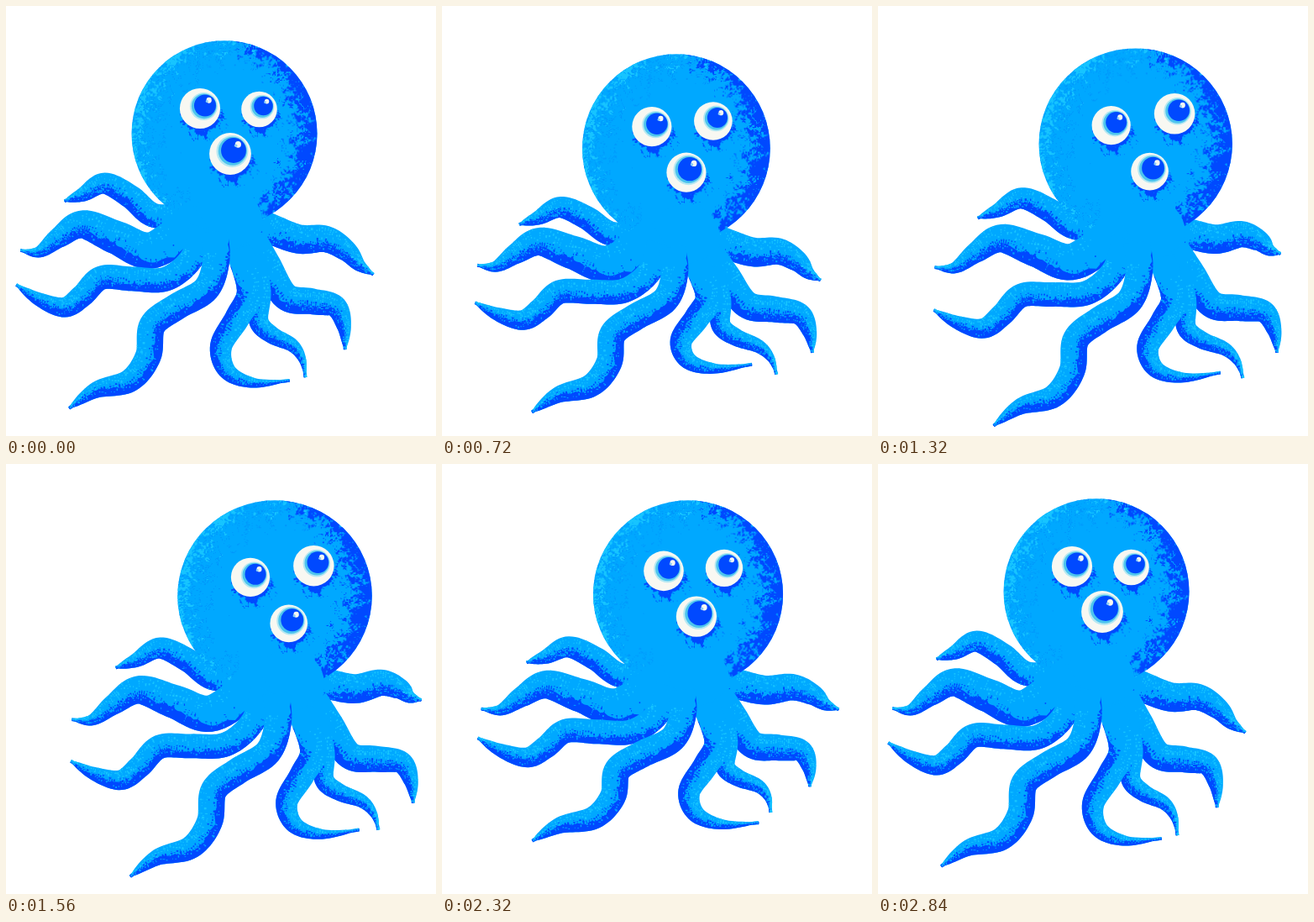
An HTML page with a canvas for the animation above (2880 ms loop, 512x512 px).

```html
<!DOCTYPE html>
<html lang="en">
<head>
<meta charset="utf-8">
<title>Octopus</title>
<style>
  html, body { margin: 0; width: 100%; height: 100%; overflow: hidden; background: #fff; }
  canvas { display: block; width: 512px; height: 512px; }
</style>
</head>
<body>
<canvas id="stage" width="512" height="512"></canvas>
<script>
const ctx = document.getElementById('stage').getContext('2d');
const BASE = '#00a8ff', DARK = '#0049ff', LIGHT = '#16c4ff', WHITE = '#f8f8f2';
const LOOP = 2880, CYCLE = 2840, STEP = 40;

// Where the head's centre is at a few times; the rest of the body follows it.
const HEAD_PATH = [
  { t: 0, x: 260, y: 152 }, { t: 400, x: 271, y: 163 }, { t: 1080, x: 291, y: 171 },
  { t: 1560, x: 320, y: 157 }, { t: 2000, x: 319, y: 156 }, { t: 2320, x: 293, y: 155 }
];

// Smooth closed curve through the keys.
function along(path, t, axis) {
  const n = path.length;
  const key = i => path[(i + n) % n];
  const span = i => (key(i + 1).t - key(i).t + CYCLE) % CYCLE;
  const rise = i => (key(i + 1)[axis] - key(i)[axis]) / span(i);
  const slope = i => (span(i) * rise(i - 1) + span(i - 1) * rise(i)) / (span(i - 1) + span(i));
  let i = n - 1;
  while (path[i].t > t) i--;
  const h = span(i), u = (t - path[i].t) / h, v = 1 - u;
  return v * v * (1 + 2 * u) * key(i)[axis] + u * u * (3 - 2 * u) * key(i + 1)[axis] +
    h * u * v * (v * slope(i) - u * slope(i + 1));
}

function seeded(seed) {
  return () => {
    seed = (seed + 0x6d2b79f5) | 0;
    let r = Math.imul(seed ^ (seed >>> 15), 1 | seed);
    r = (r + Math.imul(r ^ (r >>> 7), 61 | r)) ^ r;
    return ((r ^ (r >>> 14)) >>> 0) / 4294967296;
  };
}

function hash(x, y) {
  let h = Math.imul(x, 374761393) + Math.imul(y, 668265263);
  h = Math.imul(h ^ (h >>> 13), 1274126177);
  return ((h ^ (h >>> 16)) >>> 0) / 4294967296;
}

function valueNoise(x, y) {
  const i = Math.floor(x), j = Math.floor(y);
  const ease = f => f * f * (3 - 2 * f);
  const mix = (a, b, f) => a + (b - a) * f;
  const u = ease(x - i), v = ease(y - j);
  return mix(mix(hash(i, j), hash(i + 1, j), u),
             mix(hash(i, j + 1), hash(i + 1, j + 1), u), v);
}

const grain = (x, y) =>
  0.5 * valueNoise(x / 5, y / 5) + 0.5 * valueNoise(x / 1.6 + 50, y / 1.6) - 0.5;

// Square texture; shade(x, y, px, py) gets coordinates from -1 to 1.
function texture(size, shade) {
  const tile = document.createElement('canvas');
  tile.width = tile.height = size;
  const c = tile.getContext('2d');
  for (let py = 0; py < size; py++) {
    for (let px = 0; px < size; px++) {
      const color = shade(2 * px / size - 1, 2 * py / size - 1, px, py);
      if (color) {
        c.fillStyle = color;
        c.fillRect(px, py, 1, 1);
      }
    }
  }
  return tile;
}

const headSkin = texture(228, (x, y, px, py) => {
  const n = grain(px, py), m = grain(px + 300, py + 90);
  const rim = Math.hypot(x + 0.2, y) - 0.25 * Math.max(0, 0.45 - x) + n * 0.62;
  if (rim > 1.04) return DARK;
  if (rim > 0.99) return '#007cff';
  const glow = Math.hypot(x - 0.2, y - 0.1) + m * 0.85;
  if (glow > 1.22) return LIGHT;
  if (glow < 1.1 && glow > 1.05) return '#0096fb';
});

const SHADOW = 1.6;
const eyeShadow = texture(78, (x, y, px, py) => {
  const r = Math.hypot(x, y) * SHADOW;
  const score = grain(px + 700, py) + 0.42 * (y + 0.2 * x) * SHADOW / r - 0.7 * (r - 1) - 0.2;
  return score > 0.06 ? DARK : score > 0 ? '#0078ff' : null;
});

// Place and radius relative to the head, how far each leans with the swing, and the pupil.
const EYES = [
  { at: [-29, -26, 23.6], lean: [0, -4, 0.5], pupil: [6, -3.5, 0.54] },
  { at: [44, -32.5, 22.8], lean: [-2.5, 3.5, -1.5], pupil: [5, -4, 0.53] },
  { at: [12, 28.5, 23.6], lean: [-5, -4.5, 1.3], pupil: [4, -4, 0.6] }
];

// An arm at rest, measured from the hub, root to tip. `side` is the shaded side,
// `taper` the power of the thinning; `swing` is the tip's cosine and sine sway.
function arm({ side, width, taper, swing, joints }, index) {
  const rnd = seeded(17 + 31 * index);
  const bell = () => rnd() + rnd() + rnd() - 1.5;
  const size = () => 0.8 + 2.4 * rnd() * rnd();
  const dabs = (count, across) => Array.from({ length: count }, () => {
    const s = rnd();
    return { s, v: across(s), w: size(), h: size() };
  });
  const points = [];
  for (let i = 0; i < joints.length; i += 2) points.push([joints[i], joints[i + 1]]);
  const n = points.length * 32;
  return {
    side, width, taper, swing, points,
    rough: Array.from({ length: 128 }, () => 0.28 * (rnd() - 0.5)),
    layers: [
      [DARK, dabs(n * 1.6, s => shadeEdge(s) + 0.4 * bell())],
      [BASE, dabs(n * 0.4, s => shadeEdge(s) + 0.2 + 0.25 * bell())],
      [LIGHT, dabs(n, () => -0.55 + 0.5 * bell())]
    ]
  };
}

// Inner border of the shaded band, 1 being the outer edge.
function shadeEdge(s) {
  return 0.36 + 0.9 * Math.max(0, 0.25 - s) / 0.25 - 1.2 * Math.max(0, s - 0.7);
}

const behind = [
  { side: -1, width: 29, taper: 4, swing: [6, 2.6, -3.4, 2],
    joints: [-41, -11, -87, -7, -118, -28, -150, -42, -177, -29, -200, -21] },
  { side: 1, width: 36, taper: 3, swing: [9, -3.5, 20, 13],
    joints: [20, -6, 51, 4, 82, 12, 113, 9, 136, 19, 150, 32, 165, 39] }
].map(arm);

const front = [
  { side: 1, width: 33, taper: 4, swing: [-4.8, 6.3, 4.1, 6.7],
    joints: [30, 18, 48, 46, 71, 81, 103, 86, 132, 91, 143, 113, 145, 138] },
  { side: 1, width: 25, taper: 2.5, swing: [-8, 7.6, 5, 4.4],
    joints: [32, 36, 41, 76, 40, 108, 57, 123, 83, 134, 96, 149, 101, 168] },
  { side: 1, width: 32, taper: 2.5, swing: [-4.8, 0.5, 8.9, -7.4],
    joints: [13, 28, 28, 74, 14, 103, -5, 134, 4, 161, 36, 172, 79, 168] },
  { side: -1, width: 45, taper: 2, swing: [5.6, 4.6, -4.3, -1.5],
    joints: [-32, -8, -89, 31, -134, 18, -175, 4, -204, 19, -229, 36, -252, 35] },
  { side: -1, width: 29, taper: 6, swing: [3.7, 5, -9.3, 2.6],
    joints: [-31, 5, -43, 41, -74, 65, -115, 66, -152, 66, -175, 87, -197, 101, -228, 93, -255, 78] },
  { side: -1, width: 32, taper: 7, swing: [-0.4, 5.5, -5, 8],
    joints: [-16, 10, -13, 41, -25, 75, -61, 96, -89, 117, -94, 152, -116, 180, -156, 191, -188, 212] }
].map((spec, i) => arm(spec, i + behind.length));

// Everything that depends on time, for one moment of the cycle.
function poseAt(t) {
  const a = 2 * Math.PI * t / CYCLE, cos = Math.cos(a), sin = Math.sin(a);
  const x = along(HEAD_PATH, t, 'x'), y = along(HEAD_PATH, t, 'y');
  return {
    cos, sin, x, y,
    rx: 113 - 2.5 * cos - 1.2 * sin,
    ry: 112.3 - 1.5 * cos,
    hubX: x + 10.5 - 7 * cos,
    hubY: y + 106 + 2 * sin,
    stretch: 1 + 0.07 * Math.cos(2 * a - 0.35)
  };
}

// Samples of the centre line with half width and the normal on the shaded side.
function spine(limb, pose) {
  const last = limb.points.length - 1, parts = 12, out = [];
  const [cx, sx, cy, sy] = limb.swing;
  const pts = limb.points.map(([x, y], i) => [
    pose.hubX + x + (cx * pose.cos + sx * pose.sin) * i / last,
    pose.hubY + y * pose.stretch + (cy * pose.cos + sy * pose.sin) * i / last
  ]);
  for (let k = 0; k <= last * parts; k++) {
    const i = Math.min(Math.floor(k / parts), last - 1), u = k / parts - i;
    const a = pts[Math.max(i - 1, 0)], b = pts[i], c = pts[i + 1], d = pts[Math.min(i + 2, last)];
    const bend = j => 2 * a[j] - 5 * b[j] + 4 * c[j] - d[j];
    const twist = j => 3 * (b[j] - c[j]) + d[j] - a[j];
    const curve = j => b[j] + 0.5 * u * (c[j] - a[j] + u * (bend(j) + u * twist(j)));
    const rate = j => c[j] - a[j] + u * (2 * bend(j) + 3 * u * twist(j));
    const dx = rate(0), dy = rate(1), len = Math.hypot(dx, dy) || 1;
    const s = k / (last * parts);
    out.push({
      x: curve(0), y: curve(1),
      r: Math.max(4, limb.width * (1 - s ** limb.taper)) / 2,
      nx: -dy / len * limb.side, ny: dx / len * limb.side
    });
  }
  return out;
}

const offset = (p, v) => [p.x + p.nx * p.r * v, p.y + p.ny * p.r * v];

function band(line, inner, outer) {
  const path = new Path2D(), n = line.length - 1;
  line.forEach(p => path.lineTo(...offset(p, outer)));
  for (let i = n; i >= 0; i--) path.lineTo(...offset(line[i], inner(i / n, i)));
  path.closePath();
  return path;
}

function drawArm(limb, pose) {
  const line = spine(limb, pose), n = line.length - 1;
  const shape = band(line, () => -1, 1);
  ctx.save();
  ctx.fillStyle = BASE;
  ctx.fill(shape);
  ctx.clip(shape);
  ctx.fillStyle = DARK;
  ctx.fill(band(line, (s, i) => Math.min(1.1, shadeEdge(s) + limb.rough[i]), 1.1));
  for (const [color, dabs] of limb.layers) {
    ctx.fillStyle = color;
    for (const { s, v, w, h } of dabs) {
      if (s < 0.1) continue;
      const [x, y] = offset(line[Math.round(s * n)], v);
      ctx.fillRect(x - w / 2, y - h / 2, w, h);
    }
  }
  ctx.restore();
}

function oval(x, y, rx, ry, color) {
  ctx.beginPath();
  ctx.ellipse(x, y, rx, ry, 0, 0, 2 * Math.PI);
  ctx.fillStyle = color;
  ctx.fill();
}

function drawHead({ x, y, rx, ry }) {
  ctx.save();
  oval(x, y, rx, ry, BASE);
  ctx.clip();
  ctx.drawImage(headSkin, x - rx, y - ry, 2 * rx, 2 * ry);
  ctx.restore();
}

function drawEye({ at, lean, pupil }, pose) {
  const [dx, dy, r] = at.map((value, i) => value + lean[i] * pose.cos);
  const x = pose.x + dx, y = pose.y + dy, sr = r * SHADOW;
  const px = x + pupil[0], py = y + pupil[1], pr = r * pupil[2];
  ctx.drawImage(eyeShadow, x - sr, y - sr, 2 * sr, 2 * sr);
  oval(x, y, r, r, WHITE);
  oval(px - 1.5, py + 1, pr * 1.27, pr * 1.27, '#b4e8f2');
  oval(px - 1.2, py + 0.8, pr * 1.14, pr * 1.14, '#4cc4ee');
  oval(px, py, pr, pr, DARK);
  oval(px + pr * 0.36, py - pr * 0.48, pr * 0.24, pr * 0.26, WHITE);
  oval(px + pr * 0.18, py - pr * 0.38, pr * 0.12, pr * 0.12, '#8ccdf5');
}

function draw(t) {
  const pose = poseAt(t);
  ctx.fillStyle = '#fff';
  ctx.fillRect(0, 0, 512, 512);
  behind.forEach(limb => drawArm(limb, pose));
  drawHead(pose);
  oval(pose.hubX, pose.hubY, 42, 42, BASE);
  front.forEach(limb => drawArm(limb, pose));
  EYES.forEach(eye => drawEye(eye, pose));
}

function frame() {
  const t = performance.now() % LOOP;
  draw(Math.floor(t / STEP) * STEP % CYCLE);
  requestAnimationFrame(frame);
}
frame();
</script>
</body>
</html>
```
